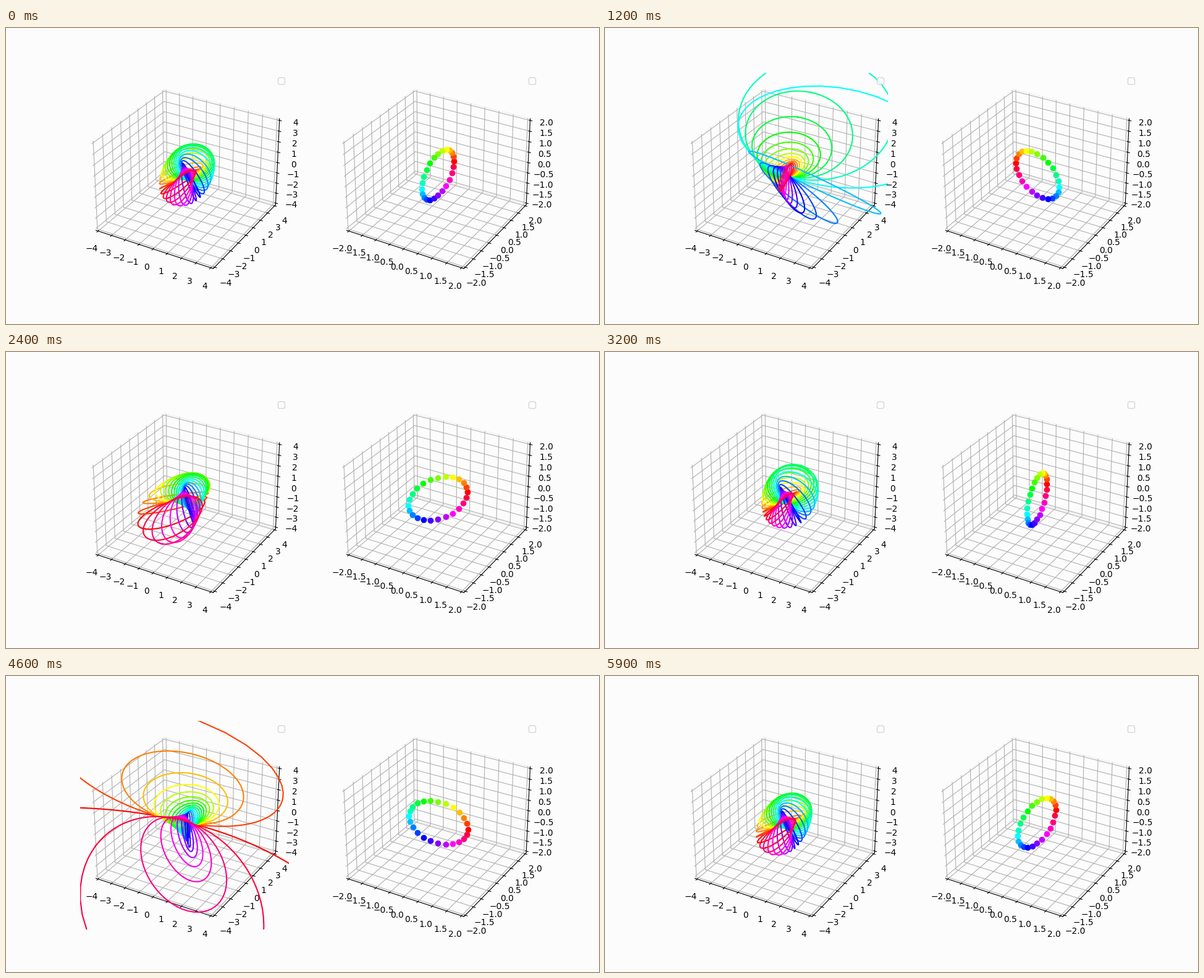
Animation, 960 px wide and 480 px high, one loop 6000 ms. Source, as a matplotlib script:

```python
import numpy as np
import matplotlib.pyplot as plt
from matplotlib.animation import FuncAnimation
from matplotlib.colors import hsv_to_rgb

FRAMES, INTERVAL = 60, 100
COUNT = 24
BACK = "#fcfcfc"

t = np.linspace(0, 2 * np.pi, 361)
theta = 2 * np.pi * np.arange(COUNT) / COUNT
colors = [hsv_to_rgb((i / COUNT, 1, 1)) for i in range(COUNT)]


def make_axes(fig, slot, lim):
    ax = fig.add_subplot(1, 2, slot, projection="3d", facecolor=BACK)
    ticks = np.linspace(-lim, lim, 9)
    edge = lim * 25 / 24  # panes reach slightly past the outer ticks
    ax.set(xticks=ticks, yticks=ticks, zticks=ticks)
    ax.set(xlim=(-edge, edge), ylim=(-edge, edge), zlim=(-edge, edge))
    for axis in (ax.xaxis, ax.yaxis, ax.zaxis):
        axis.pane.fill = False
    ax.legend(handles=[], loc="upper right")
    return ax


def base_points(phi):
    """Great circle through the z poles, turned by phi."""
    return np.column_stack([np.cos(theta) * np.cos(phi),
                            np.cos(theta) * np.sin(phi),
                            np.sin(theta)])


def fiber(p):
    """Hopf fiber over p, projected stereographically to 3D."""
    a = np.sqrt((1 + p[0]) / 2)
    b = np.sqrt((1 - p[0]) / 2)
    beta = np.arctan2(p[2], p[1])
    den = 1 - a * np.cos(t)
    den[den < 1e-9] = np.nan  # point at infinity
    return (a * np.sin(t) / den,
            -b * np.cos(beta + t) / den,
            b * np.sin(beta + t) / den)


fig = plt.figure(figsize=(9.6, 4.8), dpi=100, facecolor=BACK)
fiber_ax = make_axes(fig, 1, 4)
base_ax = make_axes(fig, 2, 2)
fibers = [fiber_ax.plot([], [], [], color=c)[0] for c in colors]
dots = [base_ax.plot([], [], [], "o", color=c)[0] for c in colors]


def update(frame):
    phi = np.radians((90 + 6 * frame) % 180)
    for p, line, dot in zip(base_points(phi), fibers, dots):
        line.set_data_3d(*fiber(p))
        dot.set_data_3d(*p[:, None])
    return fibers + dots


anim = FuncAnimation(fig, update, frames=FRAMES, interval=INTERVAL,
                     init_func=lambda: update(0), repeat=True, repeat_delay=0)
plt.show()
```
